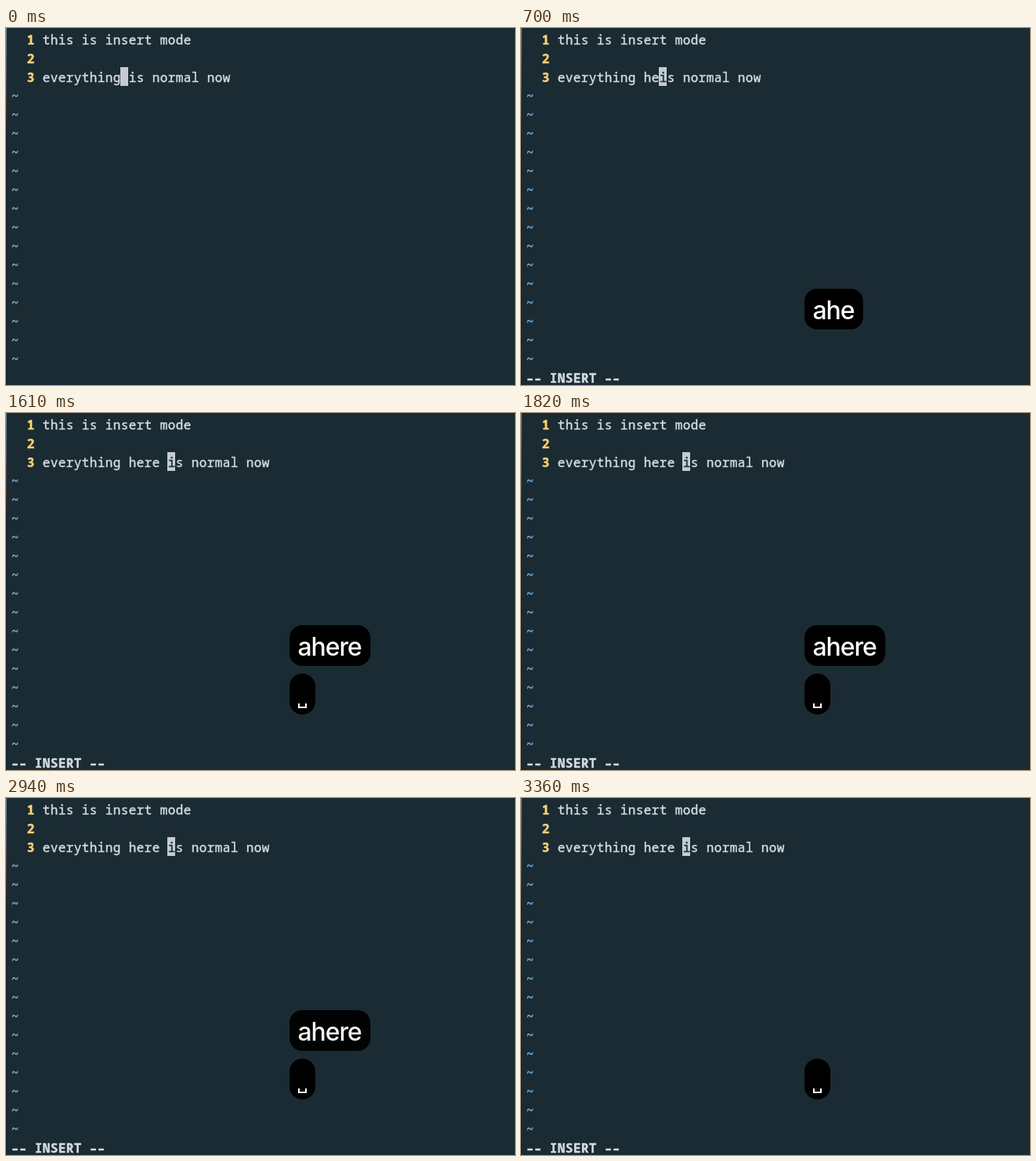
These frames come from a looping animation (650 by 456 pixels, 3.5 s). An HTML page with a canvas:

```html
<!DOCTYPE html>
<html lang="en">
<head>
<meta charset="utf-8">
<title>Insert mode</title>
<style>
html, body { margin: 0; width: 100%; height: 100%; overflow: hidden; background: #1b2b33; }
canvas { display: block; width: 650px; height: 456px; }
</style>
</head>
<body>
<canvas id="stage" width="650" height="456"></canvas>
<script>
const ctx = document.getElementById('stage').getContext('2d');
const LOOP = 3500, STEP = 70;
const CELL_W = 10, CELL_H = 24, LEFT = 6, TOP = 2;
const BG = '#1b2b33', FG = '#d5dbe5', GOLD = '#fcd274', BLUE = '#72b2e2', CURSOR = '#c4cbd5';
const MONO = '"Noto Sans Mono", "DejaVu Sans Mono", monospace';
const SANS = 'Inter, "Liberation Sans", sans-serif';

// Time at which each key is pressed
const PRESS_A = 70, PRESS_SPACE = 1400;
const LETTERS = [[350, 'h'], [560, 'e'], [770, 'r'], [910, 'e']];
const FADE_START = 2930, FADE_END = 3150;

// Text on the terminal grid, one character per cell, slightly thickened
function put(text, col, row, color, weight = 500) {
  ctx.font = `${weight} 16px ${MONO}`;
  ctx.textAlign = 'center';
  ctx.fillStyle = ctx.strokeStyle = color;
  ctx.lineWidth = 0.4;
  [...text].forEach((ch, i) => {
    const x = LEFT + (col + i + 0.55) * CELL_W, y = TOP + row * CELL_H + 19;
    ctx.fillText(ch, x, y);
    ctx.strokeText(ch, x, y);
  });
}

function drawCursor(line, col) {
  ctx.fillStyle = CURSOR;
  ctx.fillRect(LEFT + (col + 4) * CELL_W, TOP + 2 * CELL_H, CELL_W, CELL_H);
  put(line[col], col + 4, 2, BG);
}

function keyBox(width, y) {
  ctx.fillStyle = '#000';
  ctx.beginPath();
  ctx.roundRect(362, y, width, 52, 16);
  ctx.fill();
}

function drawKeys(text, y, alpha) {
  ctx.save();
  ctx.globalAlpha = alpha;
  ctx.font = `500 32px ${SANS}`;
  ctx.letterSpacing = '-1.1px';
  ctx.textAlign = 'left';
  keyBox(ctx.measureText(text).width + 22, y);
  ctx.fillStyle = '#fff';
  ctx.fillText(text, 372.5, y + 38.5);
  ctx.restore();
}

function drawSpaceKey() {
  keyBox(33, 333);
  ctx.strokeStyle = '#fff';
  ctx.lineWidth = 2;
  ctx.beginPath();
  ctx.moveTo(374, 371);
  ctx.lineTo(374, 376);
  ctx.lineTo(383, 376);
  ctx.lineTo(383, 371);
  ctx.stroke();
}

// Sliver of the desktop along the window's left edge
function drawEdge() {
  const edge = ctx.createLinearGradient(0, 0, 0, 140);
  edge.addColorStop(0, '#6f7c84');
  edge.addColorStop(0.5, '#4c4a52');
  edge.addColorStop(0.75, '#4a2b30');
  edge.addColorStop(1, '#121d23');
  ctx.fillStyle = edge;
  ctx.fillRect(0, 0, 1, 456);
}

function draw(t) {
  ctx.fillStyle = BG;
  ctx.fillRect(0, 0, 650, 456);
  drawEdge();

  const inserting = t >= PRESS_A, spaced = t >= PRESS_SPACE;
  const word = LETTERS.filter(([at]) => t >= at).map(([, ch]) => ch).join('');
  const typed = word + (spaced ? ' ' : '');
  const line = 'everything ' + typed + 'is normal now';

  for (let row = 0; row < 3; row++) put(String(row + 1), 2, row, GOLD, 600);
  for (let row = 3; row < 18; row++) put('~', 0, row, BLUE);
  put('this is insert mode', 4, 0, FG);
  put(line, 4, 2, FG);
  drawCursor(line, inserting ? 11 + typed.length : 10);

  if (!inserting) return;
  put('–– INSERT ––', 0, 18, FG, 900);
  const fade = (t - FADE_START) / (FADE_END - FADE_START);
  const alpha = 1 - Math.min(1, Math.max(0, fade));
  if (alpha > 0) drawKeys('a' + word, spaced ? 271 : 333, alpha);
  if (spaced) drawSpaceKey();
}

const start = performance.now();
function tick() {
  const t = (performance.now() - start) % LOOP;
  draw(Math.floor(t / STEP) * STEP);
  requestAnimationFrame(tick);
}
tick();
</script>
</body>
</html>
```
